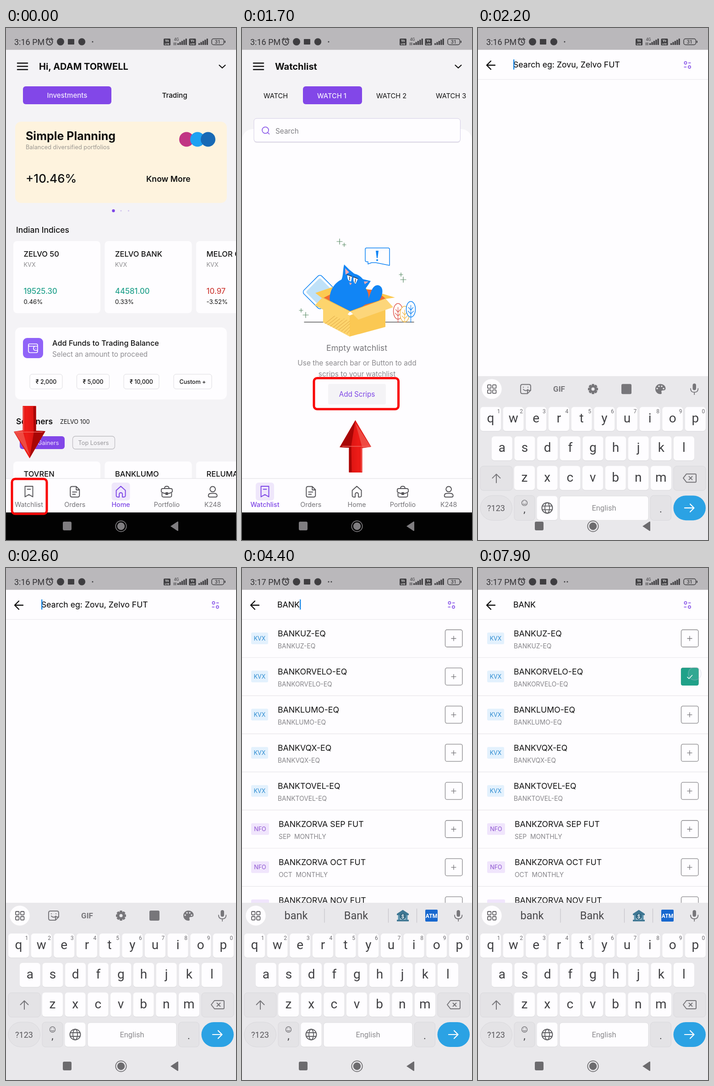
These frames come from a looping animation (502 px wide and 1115 px high, 8000 ms). An HTML page:

```html
<!DOCTYPE html>
<html lang="en">
<head>
<meta charset="utf-8">
<title>Adding scrips to a watchlist</title>
<style>
html, body { margin: 0; width: 100%; height: 100%; overflow: hidden; background: #fefdff; }
svg { display: block; width: 100%; height: 100%; font-family: Inter, sans-serif; }
.status, .keys { font-family: Roboto, sans-serif; }
</style>
</head>
<body>
<svg id="stage" viewBox="0 0 502 1115" xmlns="http://www.w3.org/2000/svg"></svg>
<script>
const PURPLE = '#7d46e6', INK = '#111', GRAY = '#8b8a8d', WHITE = '#fefdff';

const text = (x, y, str, size, fill = INK, weight = 400, anchor = 'start') =>
  `<text x="${x}" y="${y}" font-size="${size}" fill="${fill}" font-weight="${weight}" text-anchor="${anchor}">${str}</text>`;
const mid = (x, y, str, size, fill, weight) => text(x, y, str, size, fill, weight, 'middle');
const box = (x, y, w, h, r, fill, stroke = 'none', sw = 1) =>
  `<rect x="${x}" y="${y}" width="${w}" height="${h}" rx="${r}" fill="${fill}" stroke="${stroke}" stroke-width="${sw}"/>`;
const dot = (x, y, r, fill, stroke = 'none', sw = 1) =>
  `<circle cx="${x}" cy="${y}" r="${r}" fill="${fill}" stroke="${stroke}" stroke-width="${sw}"/>`;
const line = (d, color, sw = 2) =>
  `<path d="${d}" fill="none" stroke="${color}" stroke-width="${sw}" stroke-linecap="round" stroke-linejoin="round"/>`;
const shape = (d, fill) => `<path d="${d}" fill="${fill}"/>`;
const at = (x, y, body) => `<g transform="translate(${x} ${y})">${body}</g>`;
const group = (id, body, cls = '') => `<g id="${id}" class="${cls}">${body}</g>`;
const each = (list, fn) => [...list].map(fn).join('');

// Status bar
function statusBar() {
  const c = '#3f3e41';
  const bars = x => each([4, 6.5, 9, 11.5, 14], (h, i) => box(x + i * 4.4, 37 - h, 3.2, h, 1, c));
  const volte = x => box(x, 23, 15, 15, 2, c) + mid(x + 7.5, 30, 'Vo', 6.5, '#ddd', 700) + mid(x + 7.5, 36.5, 'LTE', 6, '#ddd', 700);
  return box(0, 0, 502, 47.5, 0, '#bab8bb') +
    `<text id="clock" x="18" y="37" font-size="18" fill="#333235"></text>` +
    dot(95, 30.5, 6.6, 'none', c, 2) + line('M95 27v4l3 1.5M87.5 25.5l4-3.5M102.5 25.5l-4-3.5', c, 1.8) +
    dot(119, 30, 8, c) + box(135, 24, 14, 12, 1, c) + dot(165.5, 30, 7.7, c) +
    dot(189, 30, 1.5, c) + group('moreDot', dot(195, 30, 1.5, c)) +
    volte(344) + mid(372, 28, '4G', 8.5, c) + line('M367 32v5M370.5 32v5', c, 1.5) + bars(374) +
    volte(399.5) + bars(420) +
    box(449, 23.5, 26.5, 13, 4, 'none', c, 1.5) + box(477, 27.5, 2, 5, 1, c) + mid(462, 34, '31', 10.5, c, 500);
}

// Bottom tabs and system navigation
const tabIcons = [
  'M-8.5-12h17v23l-8.5-5-8.5 5zM-3.5-5.5h7',
  'M-6-11.5h9l7 7v12q0 4-4 4h-12q-4 0-4-4v-15q0-4 4-4zM3-11v7h6.5M-5 .5h9M-5 5.5h6',
  'M-10-3l10-9 10 9v11q0 3.5-3.5 3.5h-3v-6q0-3.5-3.5-3.5t-3.5 3.5v6h-3q-3.5 0-3.5-3.5z',
  'M-9-7h18q3 0 3 3v4q-5 4-12 4t-12-4v-4q0-3 3-3zM-5-7q0-5 5-5t5 5M-10.5 3v5q0 3.5 3.5 3.5h14q3.5 0 3.5-3.5v-5M-2 2h4v4h-4z',
  'M0-11.5a5.8 5.8 0 1 1-.1 0zM-3.5 3.5h7q6 0 6 5 0 3-3 3h-13q-3 0-3-3 0-5 6-5z'
];
const tabNames = ['Watchlist', 'Orders', 'Home', 'Portfolio', 'K248'];
const sysNav = c => box(124, 1075, 19, 19, 3, c) + dot(251, 1085, 11.7, 'none', c, 1.7) + dot(251, 1085, 8.2, c) +
  shape('M359 1085l15-10q2-1 2 1v18q0 2-2 1z', c);
function tabs(active) {
  return box(0, 981, 502, 74, 0, WHITE) + line('M0 981H502', '#dddce0', 1) +
    each(tabNames, (name, i) => {
      const x = 50 + i * 100.3, on = i === active;
      return (on ? box(x - 20, 990, 40, 39, 6, '#efe7fb') : '') +
        at(x, 1010, line(tabIcons[i], on ? PURPLE : '#555458', 1.9)) +
        mid(x, 1043, name, 14.3, on ? PURPLE : '#737276', on ? 500 : 400);
    }) + box(0, 1055, 502, 60, 0, '#020202') + sysNav('#7f7d80');
}
const header = title => line('M25 76.5H47M25 83.5H47M25 90.5H47', INK, 2.5) + text(72, 91, title, 20, INK, 700) +
  line('M465.5 81l6.5 6 6.5-6', INK, 2.2);

// Annotation: arrow with its tip at 0,0 pointing down
const arrow = shape('M-15-114H14V-60L34.5-59 0 0-34.5-58-15-61Z', 'url(#red)') +
  shape('M8-113H14V-60L34-59 0 0 9-55Z', '#a80606') + shape('M-34-58L-15-60 0-6Z', '#ef4a42') +
  line('M-13-112V-60M-30-57H28', '#f4625a', 1.5);
const frame = (x, y, w, h) => box(x, y, w, h, 7, 'none', '#f90505', 5);

function home() {
  const green = '#22a18c';
  const stock = (x, name, price, pct, color) => box(x, 464, 190, 157, 8, WHITE) +
    text(x + 22.5, 498, name, 16.5, INK, 500) + text(x + 22.5, 520, 'KVX', 12.8, GRAY) +
    text(x + 22.5, 578.5, price, 16.7, color, 500) + text(x + 22.5, 601, pct, 13.3);
  const amount = (x, w, label) => box(x, 754, w, 32, 5, WHITE, '#dddce0') + mid(x + w / 2, 775, label, 12.5, INK, 500);
  return box(0, 47, 502, 1068, 0, '#f4f3f6') + header('Hi, ADAM TORWELL') +
    box(37, 127, 193, 39, 6, '#8247e8') + mid(133.5, 152, 'Investments', 15.1, '#f3eafe', 500) + mid(368, 152, 'Trading', 15.2, INK, 500) +
    box(20, 204, 462, 177, 13, '#fef3de') + text(43, 244, 'Simple Planning', 25, INK, 700) +
    text(43, 263.5, 'Balanced diversified portfolios', 12.8, '#9b9791') +
    dot(394, 242.5, 16, '#c13584') + dot(418, 242.5, 16, '#1da1f2') + dot(441, 242.5, 16, '#1769b5') +
    text(43, 336.5, '+10.46%', 26, INK, 500) + text(306, 335, 'Know More', 17.6, INK, 600) +
    dot(234.5, 398, 3.2, PURPLE) + dot(251, 398, 1.6, '#cfc1ee') + dot(267.5, 398, 1.6, '#cfc1ee') +
    text(22, 445.5, 'Indian Indices', 17.5, INK, 500) +
    stock(16, 'ZELVO 50', '19525.30', '0.46%', green) + stock(215.5, 'ZELVO BANK', '44581.00', '0.33%', green) +
    stock(415, 'MELOR QUV', '10.97', '-3.52%', '#cf423d') +
    box(20, 652, 462, 157, 12, WHITE) + box(37, 675, 44, 44, 9, '#9063f8') +
    line('M51 688h15q3 0 3 3v2M49 690v13q0 4 4 4h13q3 0 3-3v-2M51 688q-2 0-2 2.5t3 2.5h17v9h-6q-3-1-3-4.5t3-4.5M65 697.5h.1', '#fff', 1.7) +
    text(101, 691.5, 'Add Funds to Trading Balance', 16.3, INK, 500) + text(101, 716, 'Select an amount to proceed', 15.3, '#8f8e92') +
    amount(52, 71, '₹ 2,000') + amount(154.5, 71, '₹ 5,000') + amount(257, 77, '₹ 10,000') + amount(366, 83, 'Custom +') +
    text(22, 863, 'Scanners', 17.5, INK, 600) + text(118, 861.5, 'ZELVO 100', 12.7) +
    box(30, 889, 98, 28, 6, '#8247e8') + mid(79, 908, 'Top Gainers', 12.8, '#efe6fd') +
    box(145.5, 889, 92, 28, 6, 'none', '#bfbec2', 1.3) + mid(191, 908, 'Top Losers', 12.8, '#99989c') +
    each(['TOVREN', 'BANKLUMO', 'RELUMA'], (s, i) => box(16 + i * 199.5, 944, 190, 60, 8, WHITE) + text(38.5 + i * 199.5, 977, s, 16.5, INK, 500)) +
    tabs(2) + group('hint1', at(51.5, 937, arrow) + frame(13, 982, 76, 76));
}

// Cat in a box
function catScene() {
  const blue = '#1185f5';
  const tree = (x, y, c) => `<ellipse cx="${x}" cy="${y}" rx="10" ry="17" fill="#fffdfd" stroke="${c}" stroke-width="1.5"/>` +
    line(`M${x} ${y - 9}V641M${x} ${y + 2}l-5-6M${x} ${y + 2}l5-6M${x} ${y + 10}l-6-6M${x} ${y + 10}l6-6`, c, 1.2);
  const hatch = Array.from({ length: 9 }, (_, i) => `M${181 + i * 6} ${644 + i * 2.7}l${Math.min(24, 54 - i * 6)} -${Math.min(19, 43 - i * 4.5)}`).join('');
  return line('M136 640.5H375', '#555', 1.5) +
    `<g transform="rotate(45 170 575)">${box(142.5, 547.5, 55, 55, 6, '#fff', blue, 1.5)}${box(148, 553, 44, 44, 4, '#bfe1f8')}</g>` +
    tree(340.5, 617, '#df5c54') + tree(355, 623, '#f1bd54') + tree(368.5, 612.5, blue) +
    line('M272 479H319q3 0 3 3v35l-30-6h-9l-8 3v-5h-3q-3 0-3-3v-24q0-3 3-3z', blue, 1.5) +
    shape('M292 485h6l-2 16h-2z', blue) + dot(295, 505.5, 2, blue) +
    shape('M160 577L204 562 262 565 334 587 313 590 236 618 177 590Z', '#fcc951') +
    shape('M177 588L215 569 290 570 313 589 236 618Z', '#f26b30') +
    shape('M193 602C187 576 200 556 217 548C221 541 220 526 223 515Q233 526 245 535Q256 537 264 547L281 551Q276 559 270 567C282 584 275 600 262 607L236 617Z', blue) +
    shape('M266 603C282 590 279 561 296 560C311 562 308 583 299 594Z', blue) +
    shape('M225 523l9 9-8 5zM276 552l-8 6-2-6z', '#f5a9b0') +
    shape('M230 537l10 4-2 11q-9-1-8-15zM244 542l9 4-5 11q-7-4-4-15z', '#fff') +
    line('M229 537l11 4M243 542l10 4M235 542v7M248 547l-1 7', '#2b3550', 1.5) + shape('M234 554l6 2-4 4z', '#f5a9b0') +
    shape('M177 594L235 626V672L177 641Z', '#fdd46d') + shape('M235 626L313 596V651L235 672Z', '#fbc853') +
    line(hatch, '#d99d3d', .9) +
    shape('M176 586L236 617 220 636 159 604Z', '#fdd46d') + shape('M236 617L313 589 330 608 254 635Z', '#fdd67a') +
    line('M176 587L236 617 313 589', '#e7a93d', 1) +
    each([[213, 465, 6], [223, 472, 4], [347, 537, 4], [352, 548, 6], [129, 615, 4], [139, 625, 6]], ([x, y, r]) =>
      line(`M${x} ${y - r}v${2 * r}M${x - r} ${y}h${2 * r}`, '#5c8e69', 1.2));
}

function watch() {
  return box(0, 47, 502, 300, 0, '#f4f3f6') + box(0, 220, 502, 800, 24, WHITE) + header('Watchlist') +
    box(133, 127, 129, 39, 6, '#8247e8') + text(47, 152.5, 'WATCH', 14.7) + text(164, 152.5, 'WATCH 1', 14.7, '#f6f0ff', 500) +
    text(293, 152.5, 'WATCH 2', 14.7) + text(423, 152.5, 'WATCH 3', 14.7) +
    box(26, 198, 450.5, 52, 6, '#e6e4ea') + box(26, 197, 450.5, 51, 6, WHITE, '#d3cce5') +
    dot(51, 222.5, 7, 'none', PURPLE, 1.5) + line('M56.5 228l3 3', PURPLE, 1.5) + text(73, 229.5, 'Search', 15.3, '#7d7c80') +
    catScene() + mid(250.5, 703, 'Empty watchlist', 17.8, '#77767a') +
    mid(251, 735, 'Use the search bar or Button to add', 15.4, GRAY) + mid(251, 759, 'scrips to your watchlist', 15.4, GRAY) +
    box(188, 775, 126, 45, 4, '#f4f3f6') + mid(251, 803, 'Add Scrips', 15.2, PURPLE) +
    tabs(0) + group('hint2', `<g transform="translate(247.5 854) rotate(180)">${arrow}</g>` + frame(157, 762.5, 184.5, 67.5));
}

function keyboard() {
  const c = '#404043', soft = '#77767a', edge = '#d9d8dc', flat = '#e4e3e6', back = '#e9e8eb';
  const key = (x, y, ch, hint = '') => box(x - 22.5, y - 26, 45, 53, 6, '#d8d7da') + box(x - 22.5, y - 26.5, 45, 52.5, 6, WHITE) +
    mid(x, y + 7.5, ch, 28, c) + (hint && mid(x + 17.5, y - 12.5, hint, 12, '#6b6a6e'));
  const row = (keys, x, y, hints = '') => each(keys, (ch, i) => key(x + i * 49.65, y, ch, hints[i]));
  const gear = each([0, 45, 90, 135], a => `<g transform="rotate(${a} 251 757)">${box(248, 746, 6, 22, 1.5, soft)}</g>`) +
    dot(251, 757, 8, soft) + dot(251, 757, 3.5, back);
  const toolbar = line('M97 747h14q4 0 4 4v9l-7 7H97q-4 0-4-4v-12q0-4 4-4zM115 760h-7v7M99 753h.1M109 753h.1M99 758q5 5 10 0', soft, 2) +
    mid(177, 763, 'GIF', 17, soft, 700) + gear + box(313, 746, 22, 22, 3, soft) +
    shape('M398 746a11 11 0 1 0 0 22q4 0 2.5-4t3-4q6 0 6-4.5-1-9-11.5-9.5z', soft) +
    each([[391, 756], [395, 751], [401, 751], [405, 756]], ([x, y]) => dot(x, y, 1.7, back));
  const bank = shape('M338 753l13-8.500 13 8.500v3h-26zM338 766h26v3.500h-26z', '#3f7793') +
    box(340, 756, 22, 10, 0, '#a9c6d4') + each([341, 357], x => box(x, 756, 4, 10, 0, '#5c93ad')) +
    dot(351, 759, 6.500, '#2f6580') + mid(351, 763, '$', 11, '#fff', 700);
  const atm = box(400, 744, 27, 26, 2, '#1768cf') + mid(413.5, 761.500, 'ATM', 12, '#fff', 700);
  return box(0, 729, 502, 420, 0, back) + dot(30, 757, 21.7, WHITE) +
    each([[21, 748], [32, 748], [21, 759], [32, 759]], ([x, y]) => box(x, y, 7.5, 7.5, 1.5, 'none', '#626165', 1.8)) +
    group('toolbar', toolbar) +
    group('suggest', line('M180 742v30M319.5 742v30', '#c5c4c8', 1.2) +
      each([118, 249, 381], (x, i) => `<text id="word${i}" x="${x}" y="765" font-size="23.6" fill="#48474a" text-anchor="middle"></text>`)) +
    group('emojis', line('M381.5 742v30', '#c5c4c8', 1.2) + bank + atm) +
    box(468.5, 745, 7.5, 14.5, 4, soft) + line('M464 756q0 8 8.2 8t8.2-8M472.2 764v5', soft, 1.8) +
    row('qwertyuiop', 27.5, 822.5, '1234567890') + row('asdfghjkl', 52.3, 886.5) + row('zxcvbnm', 101.5, 951) +
    box(5, 925, 70, 53, 7, flat, edge) + line('M40 961v-18M31.5 951l8.5-8.5 8.5 8.5', soft, 2) +
    box(427, 925, 70, 53, 7, flat, edge) + line('M455 942h19q2 0 2 2v14q0 2-2 2h-19l-7-9zM460.5 947.5l7 7M467.5 947.5l-7 7', soft, 2) +
    box(5, 989, 69.5, 54, 27, flat, edge) + mid(39.5, 1022.5, '?123', 18, '#5a595d') +
    box(79, 989, 45, 54, 7, flat, edge) + dot(101.5, 1005, 6, 'none', soft, 1.4) + line('M99 1003h.1M104 1003h.1M98.5 1007q3 2.5 6 0', soft, 1.3) +
    mid(101.5, 1026, ',', 22, c) +
    key(151, 1016.5, '') + dot(151, 1016, 11.5, 'none', '#606064', 2) + `<ellipse cx="151" cy="1016" rx="5" ry="11.5" fill="none" stroke="#606064" stroke-width="1.8"/>` +
    line('M140.5 1012h21M140.5 1020h21', '#606064', 1.8) +
    box(178, 990, 194, 53, 6, WHITE, '#dedde0') + mid(275, 1022, 'English', 16.4, GRAY) +
    box(376.5, 989, 45, 54, 7, flat, edge) + mid(399, 1026, '.', 22, c) +
    box(426.5, 989, 70.5, 54, 27, '#2ba2e4') + line('M451 1016h20M463 1007.5l8.5 8.5-8.5 8.5', '#fff', 2.2) +
    group('popup', dot(0, 3, 34, '#cac9cd') + dot(0, 0, 34, WHITE) +
      `<text id="popKey" y="12" font-size="28" fill="#38373a" text-anchor="middle"></text>` +
      each([-4.5, 0, 4.5], x => dot(x, 25.5, 1.2, '#444')));
}

const scrips = ['BANKUZ', 'BANKORVELO', 'BANKLUMO', 'BANKVQX', 'BANKTOVEL'].map(s => [s + '-EQ', s + '-EQ'])
  .concat(['SEP', 'OCT', 'NOV'].map(m => [`BANKZORVA ${m} FUT`, `${m}&#160; MONTHLY`]));
function search() {
  const rows = each(scrips, ([name, sub], i) => {
    const fut = i > 4, x = fut ? 80 : 78;
    return at(0, i * 83.05, box(20, 140.5, fut ? 39 : 37, 25.5, 3, fut ? '#f0e5fc' : '#e3f1fd') +
      mid(fut ? 39.5 : 38.5, 158, fut ? 'NFO' : 'KVX', 12.5, fut ? '#8a4fd0' : '#2a89d0') +
      text(x, 149, name, 17.7) + text(x, 174.5, sub, 13.9, '#858488') +
      box(443.5, 134.5, 37.5, 37.5, 4, WHITE, '#88878a', 1.3) + line('M457 153.5h10M462 148.5v10', '#77767a', 1.3) +
      line('M0 195H502', '#e7e6e9', 1.2));
  });
  return box(0, 47, 502, 1068, 0, WHITE) + box(0, 1055, 502, 60, 0, '#e9e8eb') +
    line('M37 81H20M28 72l-9 9 9 9', INK, 2.4) +
    '<text id="query" x="77" y="86" font-size="17.7"></text>' + group('caret', box(0, 68.5, 2.4, 22, 0, '#1d8be8')) +
    dot(453, 76, 2.7, 'none', PURPLE, 1.4) + line('M459.5 76h4.5M450 85h4.5', PURPLE, 1.4) + dot(461.5, 85, 2.7, 'none', PURPLE, 1.4) +
    line('M0 112H502', '#e7e6e9', 1.2) + group('results', rows) +
    group('added', box(443, 217.5, 38.5, 38.5, 4, '#20a189') + line('M457 237.5l3.5 3.5 7-7.5', '#fff', 1.5)) +
    group('keyboard', keyboard(), 'keys') + sysNav('#6c6b6e') +
    group('touch', dot(0, 0, 14, 'rgba(255,255,255,.25)', '#c4c3dc', 2));
}

const stage = document.getElementById('stage');
stage.innerHTML = `<defs><linearGradient id="red"><stop offset="0" stop-color="#c90d0d"/><stop offset=".4" stop-color="#ee1c18"/>
  <stop offset="1" stop-color="#c20909"/></linearGradient></defs>` +
  group('home', home()) + group('watch', watch()) + group('search', search()) + group('status', statusBar(), 'status');

const $ = id => document.getElementById(id);
const show = (id, on) => $(id).style.display = on ? '' : 'none';
const put = (id, str) => { if ($(id).textContent !== str) $(id).textContent = str; };
const move = (id, x, y) => $(id).setAttribute('transform', `translate(${x} ${y})`);

// start time, typed text, suggested words
const typing = [
  [0, '', []], [2900, 'B', ['b', 'be', 'by']], [3300, 'BA', ['ba', 'back', 'bs']],
  [3800, 'BAN', ['ban', 'band', 'bank']], [4100, 'BANK', ['bank', 'Bank', '']]
];
// start, end, letter, popup x, popup y
const pops = [[2800, 2900, 'b', 300, 882], [3700, 3800, 'n', 349.5, 882], [4000, 4100, 'k', 399.5, 817]];
// start, end, x, y, opacity
const touches = [[2800, 3000, 297, 970, 1], [3200, 3400, 58, 892, 1], [3700, 3900, 339.5, 973, 1],
  [4000, 4200, 399, 900, 1], [7800, 7900, 473, 230, .6], [7900, 8000, 473, 230, .3]];
const during = (list, t) => list.find(([a, b]) => t >= a && t < b);

function draw(t) {
  show('home', t < 1000);
  show('watch', t >= 1000 && t < 2000);
  show('search', t >= 2000);
  show('hint1', t < 500);
  show('hint2', t >= 1300 && t < 1900);
  put('clock', t < 2900 ? '3:16 PM' : '3:17 PM');
  show('moreDot', t >= 2900);

  const slide = Math.min(1, Math.max(0, 1 - (t - 2000) / 300));
  move('keyboard', 0, 386 * slide ** 2.33);

  const [, typed, words] = typing.filter(s => s[0] <= t).pop();
  put('query', typed || 'Search eg: Zovu, Zelvo FUT');
  show('toolbar', !typed);
  show('suggest', typed);
  show('emojis', typed === 'BANK');
  for (let i = 0; i < 3; i++) put('word' + i, words[i] || '');
  show('results', t >= 4300);
  show('added', t >= 7800);

  const beat = t % 1000;
  show('caret', t < 7400 && !(t >= 3600 && t < 3800) && (t < 4450 || beat < 400 || beat >= 900));
  move('caret', 77 + (typed ? $('query').getComputedTextLength() : 0), 0);

  const pop = during(pops, t), touch = during(touches, t);
  show('popup', pop);
  if (pop) { put('popKey', pop[2]); move('popup', pop[3], pop[4]); }
  show('touch', touch);
  if (touch) { move('touch', touch[2], touch[3]); $('touch').style.opacity = touch[4]; }
}

const start = performance.now();
function tick() {
  draw((performance.now() - start) % 8000);
  requestAnimationFrame(tick);
}
tick();
</script>
</body>
</html>
```
